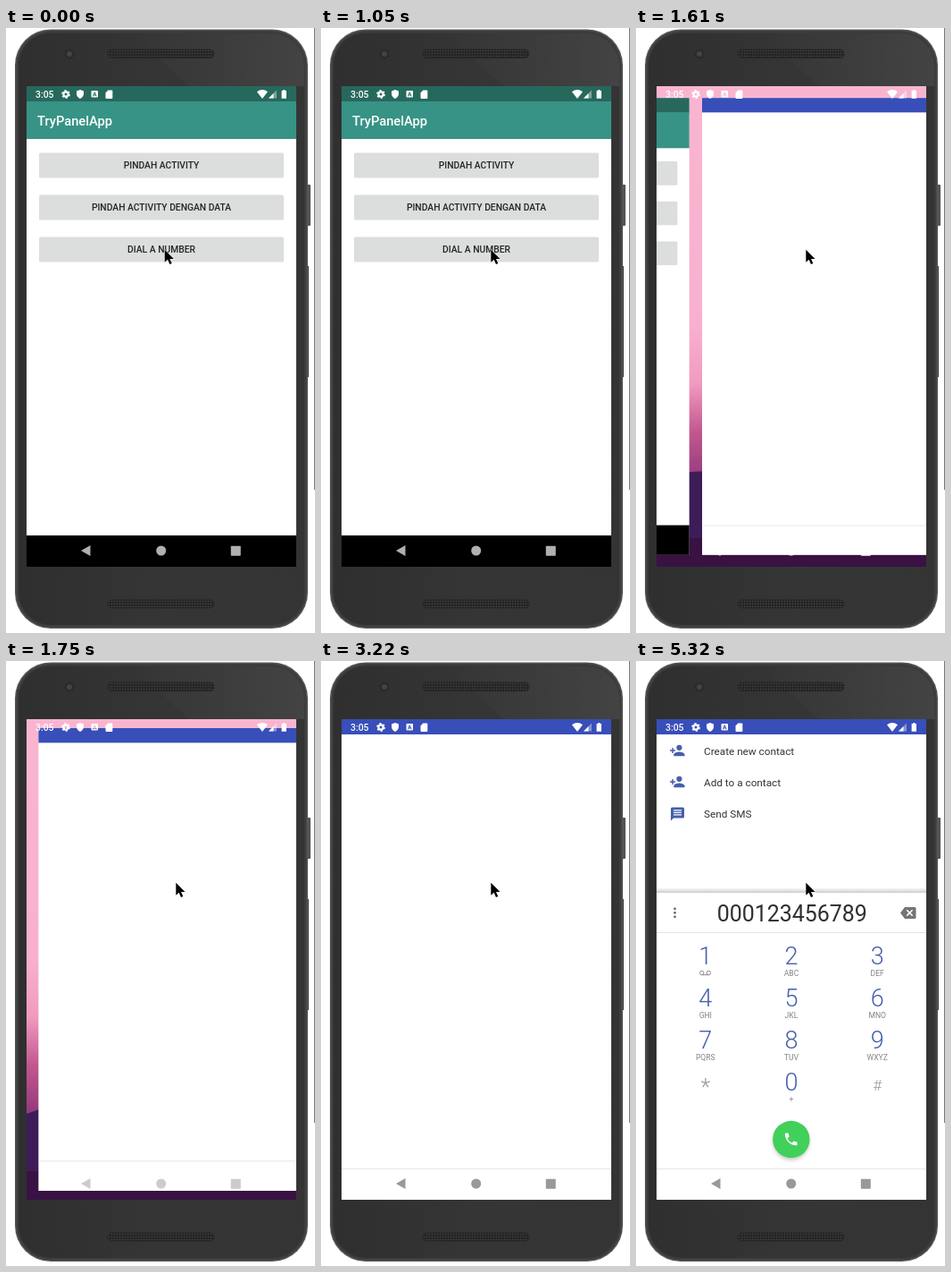
An HTML page for the animation above (5.39 s loop, 346x676 px).

```html
<!DOCTYPE html>
<html lang="id">
<head>
<meta charset="utf-8">
<title>Dial a number</title>
<style>
  html, body { margin: 0; width: 100%; height: 100%; overflow: hidden; background: #fff; }
  svg { display: block; width: 346px; height: 676px; font-family: Roboto, sans-serif; }
  .title { font-size: 14.7px; font-weight: 500; fill: #fff; }
  .button { fill: #dcdedd; }
  .label { font-size: 10.3px; font-weight: 500; fill: #242424; text-anchor: middle; }
  .entry { font-size: 11.76px; fill: #343434; }
  .icon { fill: #465fab; }
  .digit { font-size: 27px; font-weight: 300; fill: #465fab; text-anchor: middle; }
  .letters { font-size: 8.6px; fill: #858585; text-anchor: middle; }
  .number { font-size: 24.9px; fill: #303030; text-anchor: middle; }
  .clock { font-size: 10.4px; font-weight: 500; }
</style>
</head>
<body>
<svg viewBox="0 0 346 676">
  <defs>
    <clipPath id="screenClip"><rect x="23" y="65" width="302" height="537"/></clipPath>
    <clipPath id="padClip"><rect x="23" y="82" width="302" height="485"/></clipPath>
    <clipPath id="dialClip"><rect x="37" y="233.5" width="274" height="28" rx="1.5"/></clipPath>
    <linearGradient id="bodyFill" x1="0" y1="0" x2="1" y2="0">
      <stop offset="0" stop-color="#2f2f2f"/><stop offset=".5" stop-color="#353535"/><stop offset="1" stop-color="#343434"/>
    </linearGradient>
    <linearGradient id="gloss" x1="0" y1="0" x2="1" y2="0">
      <stop offset="0" stop-color="#484848" stop-opacity="0"/><stop offset="1" stop-color="#4a4a4a"/>
    </linearGradient>
    <linearGradient id="wallpaper" x1="0" y1="0" x2="0" y2="1">
      <stop offset="0" stop-color="#f9b5d0"/><stop offset=".5" stop-color="#f8b0ce"/>
      <stop offset=".62" stop-color="#f09abf"/><stop offset=".72" stop-color="#c2578f"/><stop offset=".82" stop-color="#93397d"/>
    </linearGradient>
    <linearGradient id="edgeShadow" x1="0" y1="0" x2="0" y2="1">
      <stop offset="0" stop-color="#000" stop-opacity="0"/><stop offset="1" stop-color="#000" stop-opacity=".2"/>
    </linearGradient>
    <pattern id="grille" width="3" height="3" patternUnits="userSpaceOnUse">
      <rect width="3" height="3" fill="#242424"/><circle cx="1.5" cy="1.5" r=".8" fill="#484848"/>
    </pattern>
    <mask id="letterCut">
      <rect x="95" y="69" width="9" height="10" fill="#fff"/>
      <path d="M97.5 76.300l1.800-4.600 1.800 4.600M98.100 74.900h2.400" fill="none" stroke="#000"/>
    </mask>
    <filter id="soft" x="-30%" y="-30%" width="160%" height="160%"><feGaussianBlur stdDeviation="2"/></filter>
    <g id="addPerson">
      <circle cx="48.4" cy="96.8" r="3.1"/>
      <path d="M42.3 106.2v-1.6c0-2.1 4.1-3.2 6.1-3.2s6.1 1.1 6.1 3.2v1.6zM40.3 96.9h1.5v2.3h2.3v1.5h-2.3v2.3h-1.5v-2.3H38v-1.5h2.3z"/>
    </g>
  </defs>

  <!-- Phone -->
  <path d="M345.5 0V516" stroke="#777"/>
  <rect x="336" y="175" width="5" height="46" rx="1" fill="#555"/>
  <rect x="336" y="266" width="3" height="124" fill="#444"/>
  <rect x="10" y="1.5" width="328" height="669.5" rx="40" fill="#565656"/>
  <rect x="11.5" y="3" width="325" height="666.5" rx="38.5" fill="#3d3d3d"/>
  <rect x="14" y="5.5" width="320" height="661.5" rx="36" fill="url(#bodyFill)"/>
  <path d="M140 6H298a36 36 0 0 1 36 36V65H205z" fill="url(#gloss)" opacity=".7"/>
  <circle cx="71" cy="29" r="5.5" fill="#2b2b2b"/><circle cx="71" cy="29" r="3" fill="#434343"/>
  <rect x="114" y="24" width="119" height="9.5" rx="4.5" fill="url(#grille)" stroke="#262626"/>
  <rect x="114" y="639" width="119" height="9" rx="4.5" fill="url(#grille)" stroke="#262626"/>

  <g clip-path="url(#screenClip)">
    <rect x="23" y="65" width="302" height="537" fill="url(#wallpaper)"/>
    <path d="M23 506Q66 488 110 500T325 520V602H23z" fill="#3d1d58"/>
    <path d="M23 570H325V602H23z" fill="#391243"/>

    <g id="menuWindow">
      <rect x="23" y="65" width="302" height="537" fill="#fff"/>
      <rect x="23" y="65" width="302" height="17.5" fill="#27685d"/>
      <rect x="23" y="82" width="302" height="42" fill="#379385"/>
      <rect x="23" y="567" width="302" height="35"/>
      <text class="title" x="35" y="109">TryPanelApp</text>
      <g id="buttons"></g>
    </g>

    <g id="dialWindow">
      <rect x="23" y="65" width="302" height="537" fill="#fff"/>
      <rect x="23" y="65" width="302" height="17" fill="#384eb9"/>
      <g id="entries">
        <use href="#addPerson" class="icon"/>
        <use href="#addPerson" class="icon" y="35"/>
        <path class="icon" d="M40.5 163.5h12a1.5 1.5 0 0 1 1.5 1.5v9a1.5 1.5 0 0 1-1.5 1.5H42l-3 3V165a1.5 1.5 0 0 1 1.5-1.5z"/>
        <path d="M42 166.8h9M42 169.3h9M42 171.8h9" stroke="#fff" stroke-width="1.2"/>
        <text class="entry" x="76" y="105">Create new contact</text>
        <text class="entry" x="76" y="140">Add to a contact</text>
        <text class="entry" x="76" y="175">Send SMS</text>
      </g>
      <g clip-path="url(#padClip)">
        <g id="pad">
          <rect x="23" y="253" width="302" height="6" fill="url(#edgeShadow)"/>
          <rect x="23" y="259" width="302" height="330" fill="#fff"/>
          <path d="M23 303.5H325" stroke="#e2e2e2"/>
          <g fill="#666"><circle cx="43.5" cy="276.8" r="1.4"/><circle cx="43.5" cy="281.3" r="1.4"/><circle cx="43.5" cy="285.8" r="1.4"/></g>
          <text class="number" x="174.7" y="291">000123456789</text>
          <path d="M301 275h11a1.5 1.5 0 0 1 1.5 1.5v10a1.5 1.5 0 0 1-1.5 1.5h-11l-5-6.5z" fill="#747474"/>
          <path d="M303.2 278.2l6.4 6.4m0-6.4l-6.4 6.4" stroke="#fff" stroke-width="1.5"/>
          <g id="keys"></g>
        </g>
        <g id="call">
          <circle cx="173.8" cy="537" r="20.5" opacity=".22" filter="url(#soft)"/>
          <circle cx="173.8" cy="534.5" r="20.7" fill="#41d05a"/>
          <path transform="translate(164.5 525.3) scale(.76)" fill="#fff" d="M6.6 10.8c1.4 2.8 3.8 5.1 6.6 6.6l2.2-2.2c.3-.3.7-.4 1-.2 1.1.4 2.3.6 3.6.6.6 0 1 .4 1 1V20c0 .6-.4 1-1 1C10.6 21 3 13.4 3 4c0-.6.4-1 1-1h3.5c.6 0 1 .4 1 1 0 1.2.2 2.4.6 3.6.1.3 0 .7-.2 1z"/>
        </g>
      </g>
      <path d="M23 567.5H325" stroke="#e8e8e8"/>
    </g>

    <!-- System bars -->
    <g fill="#fff">
      <text class="clock" x="33" y="78">3:05</text>
      <circle cx="67" cy="74" r="2.6" fill="none" stroke="#fff" stroke-width="2.2"/>
      <circle cx="67" cy="74" r="4.1" fill="none" stroke="#fff" stroke-width="1.6" stroke-dasharray="2.15 2.15"/>
      <path d="M83 69l4 1.6v3c0 2.6-1.7 4.4-4 5.4-2.300-1-4-2.800-4-5.400v-3z"/>
      <rect x="95.5" y="70" width="7.5" height="7.5" rx=".8" mask="url(#letterCut)"/>
      <path d="M114.300 69.500h4a1 1 0 0 1 1 1v7.500a1 1 0 0 1-1 1h-5.800a1 1 0 0 1-1-1v-5.500z"/>
      <path d="M281 71.300q6-4.600 12 0l-6 7.700z"/>
      <path d="M303 69.500V78.500H294z" opacity=".4"/>
      <path d="M299.500 73V78.500H294z"/>
      <path d="M310.300 69h2v1h1.700v8.800h-5.400V70h1.700z"/>
    </g>
    <g id="nav">
      <path d="M84 584L94.500 578V590z"/>
      <circle cx="173.7" cy="584" r="5.5"/>
      <rect x="251.800" y="578.800" width="11" height="11" rx=".8"/>
    </g>
  </g>

  <path id="cursor" d="M0 0V14L3.300 11 5.700 16.300 8 15.300 5.700 10.200H10.200z" stroke="#fff" paint-order="stroke"/>
</svg>

<script>
const LOOP = 5390, STEP = 70;
const $ = id => document.getElementById(id);
const clamp = v => Math.min(1, Math.max(0, v));
const mix = (a, b, k) => a + (b - a) * k;
const span = (t, start, length) => clamp((t - start) / length);

function bezier(x1, y1, x2, y2) {
  const curve = (a, b, s) => 3 * a * s * (1 - s) ** 2 + 3 * b * s * s * (1 - s) + s ** 3;
  return x => {
    let low = 0, high = 1;
    for (let i = 0; i < 24; i++) {
      const s = (low + high) / 2;
      if (curve(x1, x2, s) < x) low = s; else high = s;
    }
    return curve(y1, y2, (low + high) / 2);
  };
}
const slide = bezier(.2, 0, 0, 1);
const standard = bezier(.4, 0, .2, 1);
const decelerate = bezier(0, 0, .2, 1);

$('buttons').innerHTML = ['PINDAH ACTIVITY', 'PINDAH ACTIVITY DENGAN DATA', 'DIAL A NUMBER'].map((label, i) => {
  const y = 139.5 + 47 * i;
  const last = i === 2;
  return (last ? `<rect id="lift" x="38" y="${y + 3}" width="272" height="28" filter="url(#soft)"/>` : '') +
    `<rect class="button" x="37" y="${y}" width="274" height="28" rx="1.5"/>` +
    (last ? '<circle id="ripple" cx="191" cy="248" clip-path="url(#dialClip)"/>' : '') +
    `<text class="label" x="174" y="${y + 17.5}">${label}</text>`;
}).join('');

const keypad = [
  ['1', ''], ['2', 'ABC'], ['3', 'DEF'], ['4', 'GHI'], ['5', 'JKL'], ['6', 'MNO'],
  ['7', 'PQRS'], ['8', 'TUV'], ['9', 'WXYZ'], ['*', ''], ['0', '+'], ['#', '']
];
const voicemail = '<path d="M73.7 350.7H81.3" stroke="#8b8b8b"/><g fill="none" stroke="#8b8b8b">' +
  '<circle cx="73.7" cy="348.5" r="2.2"/><circle cx="81.3" cy="348.5" r="2.2"/></g>';
$('keys').innerHTML = keypad.map(([digit, letters], i) => {
  const x = 77.8 + 96.2 * (i % 3), y = 338.8 + 47 * Math.floor(i / 3);
  const symbol = { '*': 'font-size:25px;fill:#999', '#': 'font-size:17px;fill:#999' }[digit] || '';
  const shift = { '*': 5, '#': 0 }[digit] || 0;
  return `<g><text class="digit" style="${symbol}" x="${x}" y="${y + shift}">${digit}</text>` +
    `<text class="letters" x="${x}" y="${y + 13}">${letters}</text>${i ? '' : voicemail}</g>`;
}).join('');
const keys = [...$('keys').children];

function place(el, dx, scale) {
  el.setAttribute('transform', `translate(${174 + dx} 333.5) scale(${scale}) translate(-174 -333.5)`);
}

function navShade(t) {
  if (t < 1370) return 176;
  if (t < 1750) return 255;
  if (t < 1890) return mix(255, 102, span(t, 1680, 210));
  const fades = [2520, 2730, 2940, 3080, 3220].filter(time => t >= time).length;
  return mix(102, 153, fades / 5);
}

function drawTouch(t) {
  const x = mix(177.7, 190.3, standard(span(t, 0, 350)));
  $('cursor').setAttribute('transform', `translate(${x} 247.8)`);
  const pressed = t < 560 ? 0 : 1 - span(t, 840, 210);
  $('ripple').setAttribute('r', mix(30, 170, span(t, 560, 210)));
  $('ripple').setAttribute('opacity', .12 * pressed);
  $('lift').setAttribute('opacity', .25 * pressed * span(t, 490, 210));
}

function drawSwitch(t) {
  const time = t - 1377;
  const moved = slide(span(time, 0, 500));
  const scale = time < 283
    ? mix(1, .95, standard(span(time, 0, 283)))
    : mix(.95, 1, standard(span(time, 283, 350)));
  const distance = 1.05 * 302 * scale;
  place($('menuWindow'), -distance * moved, scale);
  place($('dialWindow'), distance * (1 - moved), scale);
  $('dialWindow').setAttribute('visibility', time > 0 ? 'visible' : 'hidden');
  $('menuWindow').setAttribute('visibility', moved < 1 ? 'visible' : 'hidden');
  const shade = Math.round(navShade(t));
  $('nav').setAttribute('fill', `rgb(${shade},${shade},${shade})`);
}

function drawDialer(t) {
  $('entries').setAttribute('opacity', t < 4410 ? 0 : mix(.12, 1, span(t, 4410, 280)));
  $('pad').setAttribute('transform', `translate(0 ${mix(320, 0, decelerate(span(t, 4430, 400)))})`);
  keys.forEach((key, i) => {
    const delay = 4500 + 60 * Math.floor(i / 3) + 25 * (i % 3);
    key.setAttribute('transform', `translate(0 ${73 * (1 - decelerate(span(t, delay, 480)))})`);
  });
  const size = decelerate(span(t, 4800, 300));
  $('call').setAttribute('transform', `translate(173.8 534.5) scale(${size}) translate(-173.8 -534.5)`);
}

function draw() {
  const t = Math.floor(performance.now() % LOOP / STEP) * STEP;
  drawTouch(t);
  drawSwitch(t);
  drawDialer(t);
  requestAnimationFrame(draw);
}
draw();
</script>
</body>
</html>
```
